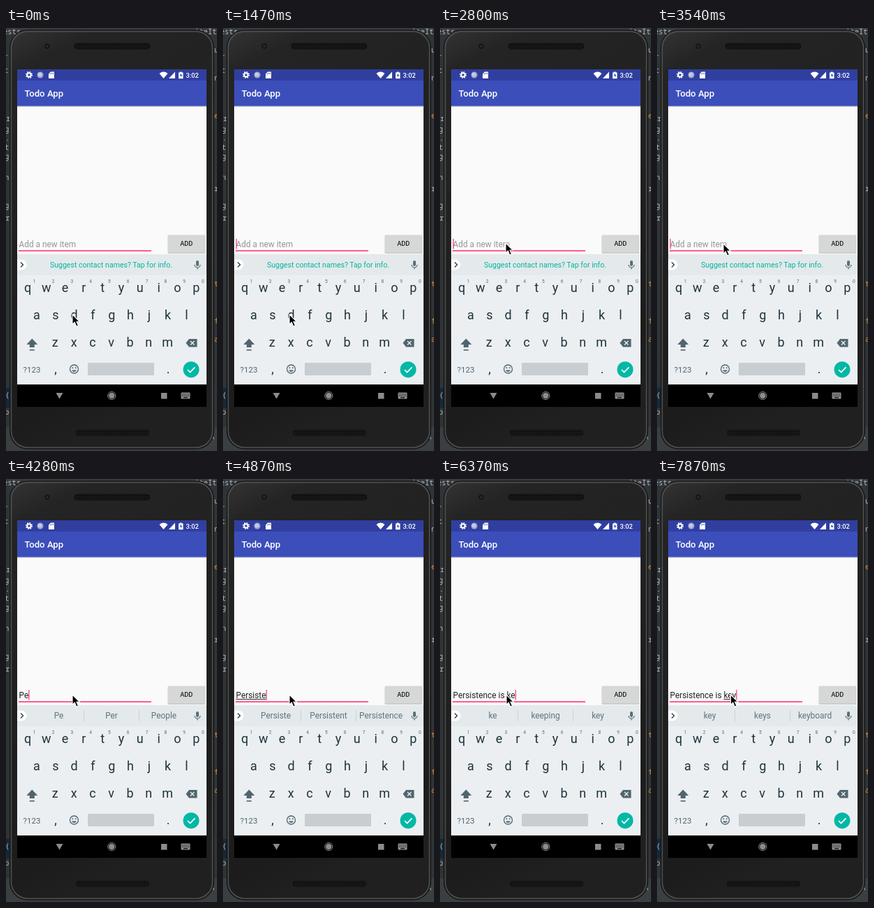
Write an HTML page that moves like this. It is 302 px wide and 604 px high and loops after 8000 ms.

```html
<!DOCTYPE html>
<html lang="en">
<head>
<meta charset="utf-8">
<title>Todo App</title>
<style>
  html, body { margin: 0; width: 100%; height: 100%; overflow: hidden; background: #2f3437; }
  svg { display: block; width: 302px; height: 604px; font-family: Roboto, sans-serif; }
  .mid { text-anchor: middle; }
  .key { font-size: 18px; fill: #1f333c; }
  .num { font-size: 6.6px; fill: #546a74; }
  .sug { font-size: 11.87px; fill: #5f747e; }
  .code { font: 10.5px "Noto Sans Mono", monospace; fill: #b4bbc0; }
  #entry { white-space: pre; }
</style>
</head>
<body>
<svg viewBox="0 0 302 604">
  <defs>
    <linearGradient id="shell" x2=".25" y2="1">
      <stop offset="0" stop-color="#343434"/>
      <stop offset=".1" stop-color="#242424"/>
      <stop offset=".9" stop-color="#1c1c1c"/>
      <stop offset="1" stop-color="#202020"/>
    </linearGradient>
    <pattern id="mesh" width="3" height="3" patternUnits="userSpaceOnUse">
      <rect width="3" height="3" fill="#111"/>
      <circle cx="1.5" cy="1.5" r=".7" fill="#262626"/>
    </pattern>
  </defs>

  <!-- editor behind the phone -->
  <rect width="302" height="604" fill="#2f3437"/>
  <rect width="302" height="3" fill="#383c40"/>
  <rect y="514" width="8" height="28" fill="#14283a"/>
  <rect y="570" width="302" height="34" fill="#3a3f42"/>
  <g id="behind"></g>

  <!-- phone -->
  <rect x="5.5" y="3" width="292" height="598" rx="25" fill="url(#shell)" stroke="#151515"/>
  <rect x="7.5" y="5" width="288" height="594" rx="23.500" fill="none" stroke="#505050" stroke-width="1.500"/>
  <circle cx="59" cy="26" r="4.5" fill="#161616" stroke="#2c2c2c"/>
  <circle cx="59" cy="26" r="1.8" fill="#2b2b31"/>
  <rect x="98" y="22" width="108" height="8" rx="4" fill="url(#mesh)" stroke="#0f0f0f"/>
  <rect x="100" y="574" width="105" height="8" rx="4" fill="url(#mesh)" stroke="#141414"/>

  <!-- app -->
  <rect x="16" y="59" width="271" height="482" fill="#fafafa"/>
  <rect x="16" y="59" width="271" height="16" fill="#303f9f"/>
  <rect x="16" y="111" width="271" height="2" fill="#000" opacity=".12"/>
  <rect x="16" y="75" width="271" height="36.5" fill="#3c4eba"/>
  <g fill="#fff">
    <circle cx="33" cy="67" r="2.7" fill="none" stroke="#fff" stroke-width="2"/>
    <circle cx="33" cy="67" r="4.3" fill="none" stroke="#fff" stroke-width="1.5" stroke-dasharray="1.7 1.677"/>
    <circle cx="49" cy="67" r="4.5" opacity=".55"/>
    <circle cx="48.5" cy="66.5" r="2.7" opacity=".4"/>
    <path d="M64 62.5h5v9.500h-8v-6.500z"/>
    <path d="M63.500 64.500v2M65.500 64v2M67.500 64v2" stroke="#303f9f" stroke-width=".8"/>
    <path d="M219.500 65q6-4.800 12 0l-6 7z"/>
    <path d="M242 62.500v9.500h-9z"/>
    <path d="M247 63.500h2v-1h2.500v1h2v8.700h-6.500z"/>
    <path d="M250.800 64.500l-2 3.500h1.400v2.600l2-3.500h-1.400z" fill="#303f9f"/>
    <text x="257.500" y="70.500" font-size="9.3" font-weight="500">3:02</text>
    <text x="26.500" y="98" font-size="13.18" font-weight="500">Todo App</text>
  </g>
  <rect x="18" y="317.300" width="190" height="1.700" fill="#ff4081"/>
  <text id="hint" x="18.500" y="313" font-size="11.87" fill="#969696">Add a new item</text>
  <text id="entry" x="18.500" y="313" font-size="11.87" fill="#212121"></text>
  <rect id="under" y="314" height="1" fill="#333"/>
  <rect id="caret" y="301" width="1.300" height="14.500" fill="#ff4081"/>
  <rect x="231.500" y="296" width="54" height="26" rx="1.500" fill="#000" opacity=".2"/>
  <rect x="232" y="295.500" width="53" height="25" rx="1.300" fill="#d6d7d7"/>
  <text class="mid" x="258.300" y="311.300" font-size="9.23" font-weight="500" fill="#212121">ADD</text>

  <!-- keyboard -->
  <rect x="16" y="323" width="271" height="30" fill="#e4e9eb"/>
  <rect x="16" y="353" width="271" height="156" fill="#ebeff2"/>
  <path d="M16 330.500h6a7.500 7.500 0 0 1 0 15h-6z" fill="#fff"/>
  <path d="M21 334.500l3.500 3.500-3.500 3.500" fill="none" stroke="#37474f" stroke-width="1.500"/>
  <g fill="#5a6f79">
    <rect x="272" y="332" width="4" height="8" rx="2"/>
    <path d="M270 338a4 4 0 0 0 8 0M274 342v2.500" fill="none" stroke="#5a6f79" stroke-width="1.200"/>
  </g>
  <text id="tip" class="mid" x="150.500" y="342" font-size="10.55" fill="#00b5a2">Suggest contact names? Tap for info.</text>
  <g id="strip">
    <path d="M111.500 330v16M190.500 330v16" stroke="#cbd3d7"/>
    <text class="sug mid" x="75.500" y="342"></text>
    <text class="sug mid" x="151" y="342"></text>
    <text class="sug mid" x="226" y="342"></text>
  </g>
  <g id="keys"></g>
  <g fill="#51656f">
    <path d="M37.300 443.500l8 8.500h-4.500v4h-7v-4h-4.500z"/>
    <rect x="33.800" y="459" width="7" height="1.600"/>
    <path d="M262 444h11.500v11.500h-11.500l-4.500-5.750z"/>
    <path d="M264 447l5.500 5.500M269.500 447l-5.500 5.500" stroke="#eceff1" stroke-width="1.400"/>
    <text class="mid" x="37" y="491.500" font-size="11.500">?123</text>
    <circle cx="97.500" cy="487" r="6" fill="none" stroke="#51656f" stroke-width="1.300"/>
    <circle cx="95.300" cy="485.300" r="1"/>
    <circle cx="99.700" cy="485.300" r="1"/>
    <path d="M94 488.500h7a3.600 3.200 0 0 1-7 0z"/>
  </g>
  <rect x="117" y="478" width="95" height="18" rx="1.500" fill="#c7cdd0"/>
  <circle cx="265" cy="487.700" r="11.500" fill="#00b8a5"/>
  <path d="M260 488l3.500 3.500 7-7.200" fill="none" stroke="#fff" stroke-width="1.700"/>

  <!-- navigation -->
  <rect x="16" y="509" width="271" height="32" fill="#000"/>
  <g fill="#8c8c8c">
    <path d="M71.500 521h10l-5 8.500z"/>
    <circle cx="151.300" cy="525" r="4.200"/>
    <circle cx="151.300" cy="525" r="5.600" fill="none" stroke="#8c8c8c"/>
    <rect x="222" y="521" width="8.500" height="8.500"/>
    <rect x="250.500" y="520.500" width="13" height="9" rx="1"/>
    <path d="M252 523h10M252 525.300h10" stroke="#000" stroke-width="1.100" stroke-dasharray="1.100 1.100"/>
    <path d="M254 527.700h6" stroke="#000" stroke-width="1.100"/>
  </g>

  <path id="mouse" d="M0 0v14.200l3.300-3 2.400 5.800 2.700-1.100-2.400-5.600h4.400z" fill="#000" stroke="#fff" stroke-width="1.100"/>
</svg>
<script>
const $ = id => document.getElementById(id);
const LOOP = 8000, LEFT = 18.5;

function label(parent, text, x, y, cls, fill) {
  const t = document.createElementNS("http://www.w3.org/2000/svg", "text");
  t.textContent = text;
  t.setAttribute("x", x);
  t.setAttribute("y", y);
  t.setAttribute("class", cls);
  if (fill) t.style.fill = fill;
  parent.append(t);
}

// letter rows: keys, first centre, baseline
[["qwertyuiop", 31, 377], ["asdfghjkl", 44, 416], ["zxcvbnm", 70.3, 455]].forEach(([row, x, y], r) =>
  [...row].forEach((c, i) => {
    const cx = x + i * 26.8;
    label($("keys"), c, cx, y, "key mid");
    if (r === 0) label($("keys"), (i + 1) % 10, cx + 9.7, 364, "num mid");
  }));
label($("keys"), ",", 71, 493, "key mid");
label($("keys"), ".", 232, 493, "key mid");

// slivers of code either side of the phone
[["ests", -4, 9], ["iteIte", 270, 9], [".", -2, 40], ["t", -3, 64], ["cr", -6, 133], ["g", -2, 148],
 [".", -1, 161], ["t", -2, 174], ["g", -2, 187], ["n", -2, 217], ["g", -2, 257], ["or", -7, 275],
 ["(", -1, 528], ["p", -2, 552], ["u", 298, 35], ["n", 298, 75], ["r", 298, 233], ["A", 292, 587]
].forEach(([s, x, y]) => label($("behind"), s, x, y, "code"));
[["e", 129], ["t", 369], ["f", 422], ["a", 448]]
  .forEach(([s, y]) => label($("behind"), s, 298, y, "code", "#d39245"));

const mouse = [
  [0, 95, 409], [2050, 62, 345], [2200, 27, 257], [2350, 23, 275],
  [2500, 30, 291], [2650, 66, 303], [2800, 94, 307], [3090, 95, 308], [7870, 105.5, 308]
];
// time, text, suggestions, last word underlined
const typing = [
  [0, "", ""], [3690, "P", ""],
  [4140, "Pe", "Pe|Per|People"], [4290, "Per", "Per|Person|Period"],
  [4430, "Pers", "Pers|Person|Persons"], [4580, "Persis", "Persis|Persist|Persists"],
  [4870, "Persiste", "Persiste|Persistent|Persistence", true],
  [5020, "Persisten", "Persisten|Persistent|Persistence", true],
  [5170, "Persistence", "Persistence|Persistent|Persist", true],
  [5320, "Persistence ", "is|of|in"],
  [5770, "Persistence i", "i|I|it"], [5920, "Persistence is", "is|I|it"],
  [6220, "Persistence is k", "k|know|keep"],
  [6370, "Persistence is ke", "ke|keeping|key"],
  [6520, "Persistence is key", "key|keys|keyboard", true]
];
const blink = [
  [0, 0], [590, 1], [1040, 0], [1470, 1], [2050, 0], [2500, 1],
  [3090, 0], [3540, 1], [6970, 0], [7570, 1]
];

const at = (steps, t) => steps.findLast(s => s[0] <= t);
const show = (el, on) => { el.style.visibility = on ? "visible" : "hidden"; };
const words = $("strip").querySelectorAll("text");
let last;

function type(step) {
  if (step === last) return;
  last = step;
  const [, text, picks, lined] = step;
  const entry = $("entry");
  entry.textContent = text;
  show($("hint"), !text);
  show($("tip"), !picks);
  show($("strip"), picks);
  show($("under"), lined);
  picks.split("|").forEach((w, i) => { words[i].textContent = w; });

  const end = text ? entry.getComputedTextLength() : 0;
  const from = text.lastIndexOf(" ") + 1;
  const start = from ? entry.getSubStringLength(0, from) : 0;
  $("caret").setAttribute("x", LEFT + end);
  $("under").setAttribute("x", LEFT + start);
  $("under").setAttribute("width", Math.max(0, end - start));
}

function draw() {
  const t = performance.now() % LOOP;
  const [, x, y] = at(mouse, t);
  $("mouse").setAttribute("transform", `translate(${x} ${y})`);
  type(at(typing, t));
  show($("caret"), at(blink, t)[1]);
  requestAnimationFrame(draw);
}
draw();
</script>
</body>
</html>
```
